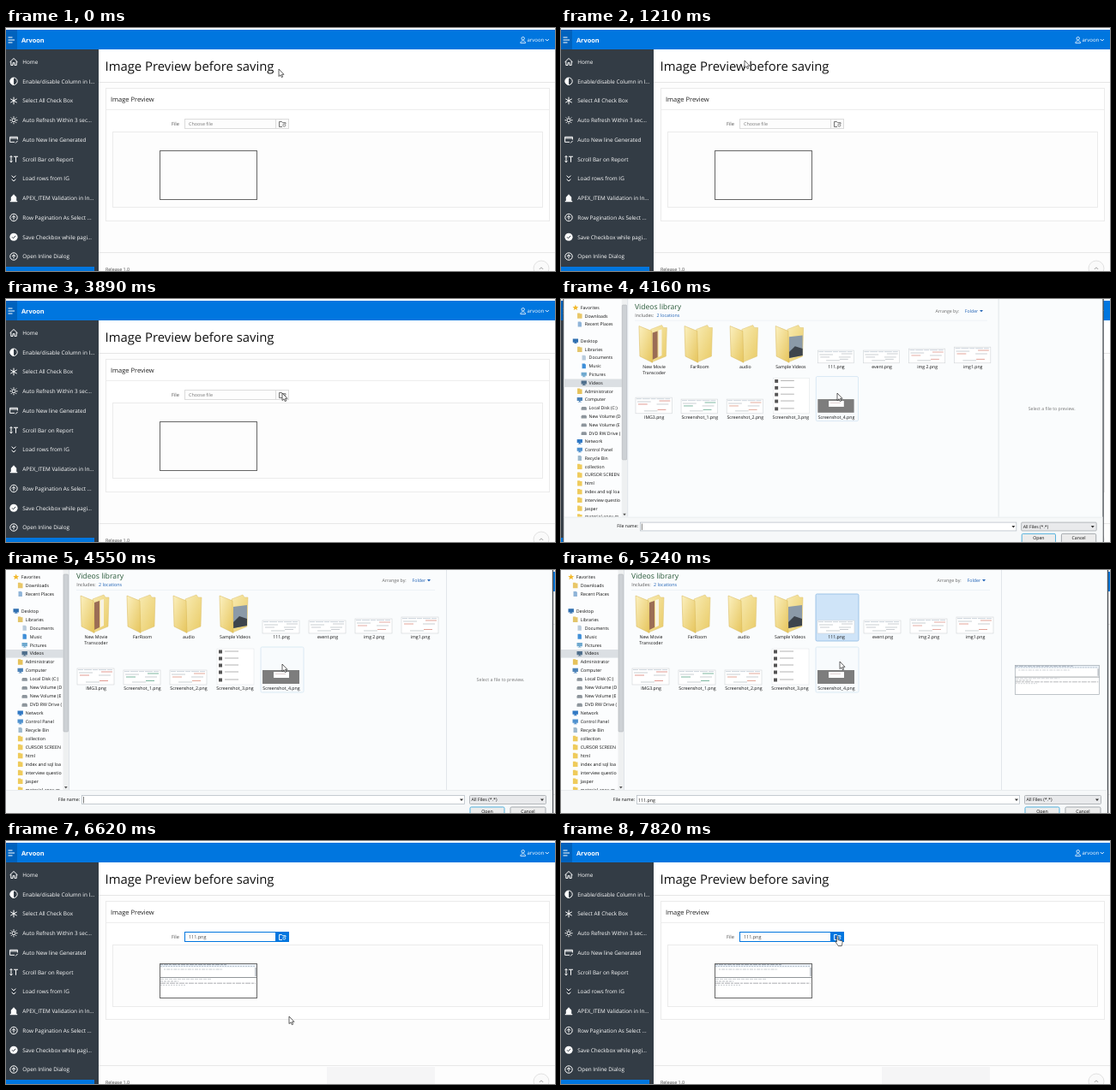
An HTML page that plays this animation: 640x284 px, repeating every 8000 ms.

```html
<!DOCTYPE html>
<html lang="en">
<head>
<meta charset="utf-8">
<title>Image preview before saving</title>
<style>
html, body { margin: 0; width: 100%; height: 100%; overflow: hidden; background: #fdfdfd; }
svg { display: block; width: 100vw; height: 100vh; }
text { font-family: "Open Sans", "Noto Sans", sans-serif; text-rendering: geometricPrecision; white-space: pre; }
</style>
</head>
<body>
<svg id="stage" viewBox="0 0 640 284" xmlns="http://www.w3.org/2000/svg"></svg>
<script>
const LOOP = 8000, BLUE = '#0076df', INK = '#111';

const text = (x, y, s, size, fill = INK, more = '') =>
  `<text x="${x}" y="${y}" font-size="${size}" fill="${fill}" ${more}>${s}</text>`;
const rect = (x, y, w, h, fill, more = '') =>
  `<rect x="${x}" y="${y}" width="${w}" height="${h}" fill="${fill}" ${more}/>`;
const frame = (x, y, w, h, stroke, more = '') =>
  rect(x + .5, y + .5, w - 1, h - 1, 'none', `stroke="${stroke}" ${more}`);
const line = (d, stroke, width = 1, more = '') =>
  `<path d="${d}" fill="none" stroke="${stroke}" stroke-width="${width}" ${more}/>`;
const shape = (d, fill, more = '') => `<path d="${d}" fill="${fill}" ${more}/>`;
const group = (id, body, more = '') => `<g id="${id}" ${more}>${body}</g>`;
const at = (x, y, body) => `<g transform="translate(${x} ${y})">${body}</g>`;
const fade = (id, from, to) => `<linearGradient id="${id}" x1="0" y1="0" x2="1" y2="1">
  <stop stop-color="${from}"/><stop offset="1" stop-color="${to}"/></linearGradient>`;
const mid = 'text-anchor="middle"';

// Miniature of a saved screen
function miniature(w, h) {
  const u = w / 114, v = h / 41;
  const bar = (y, x1, x2, c, dash = '') =>
    line(`M${x1 * u} ${y * v}H${x2 * u}`, c, .8 * v, dash && `stroke-dasharray="${dash}"`);
  return rect(0, 0, w, h, '#fff') +
    rect(0, 0, w, 4.5 * v, '#eaf0f6') +
    bar(1.6, 1, 78, '#8d9aa8', '3 1 5 1') + bar(3.4, 1, 112, '#a9b6c4', '2 1') +
    bar(7, 5, 74, '#b3bac1', '2 1.2 4 1') + rect(111 * u, 5 * v, 2 * u, 10 * v, '#c3c7cc') +
    bar(16.5, 0, 114, '#777c80') + bar(18.4, 1, 60, '#c2c6ca', '4 1') +
    bar(21, 1, 22, '#a6abb0', '3 1') + bar(23.2, 1, 112, '#96999d', '6 1 3 1') +
    bar(25.4, 1, 30, '#bcc0c4', '2 1');
}

/* ---- page ---- */
const RING = '<circle r="4.2" fill="none" stroke="#fff"/>';
const UP = RING + line('M0 2.4V-2M-2 0L0-2.2 2 0', '#fff');
const spokes = (n, r1, r2) => Array.from({ length: n }, (_, i) => {
  const a = i * 2 * Math.PI / n + Math.PI / 2, c = Math.cos(a), s = Math.sin(a);
  return `M${c * r1} ${s * r1}L${c * r2} ${s * r2}`;
}).join('');

const menu = [
  ['Home', line('M-4.5 .3L0-4 4.5.3M-3.2-.5V4H-1V1.2H1V4H3.2V-.5', '#fff')],
  ['Enable/disable Column in I...', RING + shape('M0-4.2A4.2 4.2 0 0 0 0 4.2Z', '#fff')],
  ['Select All Check Box', line(spokes(6, 0, 4.3), '#fff')],
  ['Auto Refresh Within 3 sec...', '<circle r="2" fill="none" stroke="#fff"/>' + line(spokes(8, 3, 4.5), '#fff')],
  ['Auto New line Generated', line('M1 2.8H-4.4V-3.2H4.4V0M-4.4-1.6H4.4M2 4L4.6 1.4', '#fff')],
  ['Scroll Bar on Report', line('M-3-3.6V3.6M-4.4-2.2L-3-3.8-1.6-2.2M-4.4 2.2L-3 3.8-1.6 2.2M0-3H5M2.5-3V3.5', '#fff')],
  ['Load rows from IG', line('M-2.4-3.4L0-1.2 2.4-3.4M-2.4.8L0 3 2.4.8', '#fff')],
  ['APEX_ITEM Validation in In...', shape('M-4.2 4.5V3.2H-3.2V-1L0-4.5 3.2-1V3.2H4.2V4.5Z', '#fff')],
  ['Row Pagination As Select ...', UP],
  ['Save Checkbox while pagi...', '<circle r="4.6" fill="#fff"/>' + line('M-2 0L-.5 1.6 2.2-1.4', '#333c45')],
  ['Open Inline Dialog', UP]
].map(([label, icon], i) => {
  const y = 39.5 + 22.75 * i;
  return at(9, y, icon) + text(19.3, y + 2.3, label, 6.36, '#fff');
}).join('');

const folderIcon = 'M318.5 115.5V109.5H321.5L322.5 110.7H326V112M318.5 115.5H322';

const page =
  rect(0, 0, 640, 284, '#fdfdfd') +
  rect(108, 25, 532, 38, '#fff') + line('M108 63.5H640', '#e6e6e6') +
  text(115.5, 50, 'Image Preview before saving', 14.85) +
  rect(116.5, 70.5, 517, 155, '#fff', 'id="outer" stroke="#ebebeb"') +
  line('M117 95.5H633', '#ededed') +
  rect(124.5, 121.5, 501, 88, '#fdfdfd', 'id="inner" stroke="#ebebeb"') +
  text(122, 85.8, 'Image Preview', 7.5, '#222') +
  text(193, 114.3, 'File', 5.7, '#555') +
  rect(208.5, 106.5, 106, 11, '#fdfdfd', 'id="field" stroke="#dcdcdc"') +
  text(213, 114.2, 'Choose file', 5.43, '#777', 'id="fileLabel"') +
  rect(314.5, 106.5, 15, 11, '#fbfbfb', 'id="button" stroke="#dcdcdc"') +
  group('buttonIcon', line(folderIcon, 'currentColor', .9) +
    '<circle cx="324.3" cy="113.6" r="1.5" fill="none" stroke="currentColor" stroke-width=".8"/>') +
  group('emptyBox', frame(179, 143, 114, 58, '#666')) +
  group('picture', at(179, 143, miniature(114, 41)) + frame(179, 143, 114, 41, '#666') +
    rect(374, 264, 126, 20, '#f5f5f6')) +
  line('M108 262.5H640', '#e8e8e8') +
  text(116, 283.6, 'Release 1.0', 5.35, '#444') +
  '<circle cx="624" cy="281" r="9" fill="#fafafa" stroke="#e2e2e2"/>' +
  line('M621.8 282L624 279.8 626.2 282', '#999', .9) +
  rect(0, 25, 108, 259, '#333c45') + menu + rect(0, 279, 103, 5, BLUE) +
  rect(0, 0, 640, 2, '#fff') + rect(0, 2, 640, 23, BLUE) + rect(0, 2, 13, 23, '#0062bd') +
  line('M2.5 11H7.5M2.5 14H10M2.5 17H7.5', '#fff', 1.2) +
  text(18, 16.9, 'Arvoon', 7.4, '#fff', 'font-weight="700"') +
  '<circle cx="602.7" cy="12.2" r="1.7" fill="none" stroke="#fff" stroke-width=".8"/>' +
  line('M599.8 17.6C599.8 14 605.6 14 605.6 17.6Z', '#fff', .8) +
  text(607.5, 16.3, 'arvoon', 6, '#fff') + line('M628.8 13L630.8 15 632.8 13', '#fff', .9);

/* ---- file dialog ---- */
const iconShapes = {
  star: 'M0-3.4L1 -1 3.4-.9 1.6.7 2.2 3.2 0 1.8-2.2 3.2-1.6.7-3.4-.9-1-1Z',
  folder: 'M-2.8-3.2H.2L.8-2.4H2.8V3.2H-2.8Z',
  screen: 'M-3.2-2.6H3.2V1.6H.8V2.4H2V3H-2V2.4H-.8V1.6H-3.2Z',
  drive: 'M-3.2.2L-2.4-1.4H2.4L3.2.2V2.4H-3.2Z',
  sheet: 'M-2.2-3H1L2.2-1.8V3H-2.2Z'
};
// label, indent, icon, colour ('' leaves an empty row)
const places = [
  ['Favorites', 0, 'star', '#f2b92d'], ['Downloads', 1, 'folder', '#e9c768'],
  ['Recent Places', 1, 'sheet', '#8fb4d8'], '',
  ['Desktop', 0, 'screen', '#2f6fb0'], ['Libraries', 1, 'folder', '#e3c56b'],
  ['Documents', 2, 'sheet', '#b9cbdc'], ['Music', 2, 'sheet', '#3f8fd8'],
  ['Pictures', 2, 'screen', '#6fa9cf'], ['Videos', 2, 'screen', '#4f6f8c'],
  ['Administrator', 1, 'folder', '#e6c25c'], ['Computer', 1, 'screen', '#4d83b8'],
  ...['Local Disk (C:)', 'New Volume (D', 'New Volume (E', 'DVD RW Drive (']
    .map(s => [s, 2, 'drive', '#8d959c']),
  ['Network', 1, 'screen', '#2f78c4'], ['Control Panel', 1, 'screen', '#4f91cf'],
  ['Recycle Bin', 1, 'sheet', '#9fb9cc'],
  ...['collection', 'CURSOR SCREEN', 'html', 'index and sql loa', 'interview questio', 'Jasper', 'material-apex-m']
    .map(s => [s, 1, 'folder', '#efcb5c'])
].map((p, i) => {
  if (!p) return '';
  const [label, level, icon, color] = p, x = 17.7 + 5 * level, y = 8 + 9.95 * i;
  return at(x - 6, y, shape(iconShapes[icon], color)) + text(x, y + 1.9, label, 5.25);
}).join('');

const folder = inside =>
  shape('M-4 5L9 0 11 3H15L14 37-3 44Z', 'url(#backLeaf)', 'stroke="#dcc172" stroke-width=".5"') + inside +
  shape('M-18 1L-3 7 -2 44.5-17 37Z', 'url(#frontLeaf)', 'stroke="#d6b452" stroke-width=".5"');

// Saved screen with short lines of text, some of them tinted
const sheet = (top, tint = '#c3c8cd') =>
  rect(-22, top, 43, 74 - top, '#fff', 'stroke="#cfd3d6" stroke-width=".6"') +
  line(`M-21 ${top + 1.6}H20`, '#c0cad4', .8, 'stroke-dasharray="6 1 9 1"') +
  line(`M-20 ${top + 5}H-4M3 ${top + 8}H17M-12 71H4`, '#b4babf', .7) +
  line(`M-19 ${top + 8}H-8M6 ${top + 4}H19M4 69.5H14`, tint, .9);

const listSheet = rect(-21, 32, 43, 42, '#fff', 'stroke="#dfe2e5" stroke-width=".5"') +
  [35, 43, 51, 59, 68].map(y => rect(-19, y - 1.5, 4, 4, '#555') + line(`M-12 ${y}H4`, '#aaa', .9)).join('');
const darkSheet = rect(-22, 57, 43, 16, '#7d7d7d') + rect(-9, 59, 18, 7, '#fff') + line('M-7 61.5H5', '#ccb4b4', .6);

const files = [
  ['New Movie|Transcoder', folder(shape('M-2 9L4 7V38L-2 41Z', '#9b6d55') + shape('M5 6L9 5V36L5 38Z', '#f7f2e2'))],
  ['FarRoom', folder('')],
  ['audio', folder('')],
  ['Sample Videos', folder(shape('M-2 14L14 12V36L-2 39Z', '#8b9aa8') + shape('M-2 32L5 25 14 28V36L-2 39Z', '#3d444c'))],
  ['111.png', sheet(59)], ['event.png', sheet(59)],
  ['img 2.png', sheet(57, '#e3a39a')], ['img1.png', sheet(55, '#e09a8e')],
  ['IMG3.png', sheet(55, '#df8f86')], ['Screenshot_1.png', sheet(57, '#6fae95')],
  ['Screenshot_2.png', sheet(57, '#e0a08f')], ['Screenshot_3.png', listSheet],
  ['Screenshot_4.png', darkSheet]
].map(([label, art], i) => at(105 + 54 * (i % 8), 60 * (i >> 3),
  (i < 4 ? at(0, 29, art) : art) +
  label.split('|').map((s, k) => text(0, 80 + 7 * k, s, 5.25, INK, mid)).join(''))
).join('');

const tile = (id, y, h, fill, stroke) =>
  rect(297, y, 50, h, fill, `id="${id}" rx="1.5" stroke="${stroke}" stroke-width=".8"`);
const pushBox = (x, w, fill, stroke) => rect(x, 277, w, 11, fill, `rx="1.5" stroke="${stroke}"`);

const dialog =
  rect(-2.5, -7, 640, 300, '#fafcfd', 'stroke="#4a4f55" stroke-width="1.4"') +
  rect(-2, -6, 75, 263, '#fcfdfe') + rect(-2, 93, 69, 9.6, '#dbdfe3') +
  `<g clip-path="url(#navClip)">${places}</g>` +
  rect(66.5, -6, 6.5, 263, '#eef0f1') + rect(67, 5, 5.5, 184, '#cdd1d5', 'rx="1" stroke="#a9adb1" stroke-width=".5"') +
  shape('M68 253H71.6L69.8 255.4Z', '#555') + line('M73.5 -6V257', '#dfe3e8') +
  text(82, 10, 'Videos library', 8.7, '#2a5a3a') +
  text(82.3, 19, 'Includes:', 5.4, '#555') + text(108, 19, '2 locations', 5.4, '#1f62b5') +
  text(438.5, 13.8, 'Arrange by:', 5.3, '#666') + text(473.5, 13.8, 'Folder', 5.3, '#1f62b5') +
  shape('M491 11H495L493 13.4Z', '#1f62b5') + line('M82 23.5H500', '#e9eef4', .7) +
  tile('picked', 28, 55, '#cfe4f8', '#8fb9e2') + tile('hover', 90, 53, '#f8fbfd', '#d3e5f2') + files +
  line('M513.5 -6V257', '#e2e6ea') +
  text(576.5, 130, 'Select a file to preview.', 5.3, '#777', `id="hint" ${mid}`) +
  group('preview', at(529, 111, miniature(99, 35)) + frame(529, 111, 99, 35, '#a3abb2', 'stroke-width=".7"')) +
  rect(-2, 257, 639, 34, '#f6f8f9') + line('M-2 257.5H637', '#e4e7ea', .7) +
  text(60.8, 270, 'File name:', 5.3) +
  rect(88.5, 263.5, 446, 10, '#fff', 'stroke="#b9c0c8" stroke-width=".8"') +
  shape('M529 267.5H533L531 270Z', '#333') +
  line('M90.5 265V272.5', '#222', .6, 'id="caret"') +
  rect(89.5, 264.8, 22, 7.8, '#3390e8', 'id="marked"') +
  text(90, 270.5, '111.png', 5.3, INK, 'id="name"') +
  rect(540.5, 263.5, 89, 10, '#e9eaec', 'rx="1" stroke="#a4a9ae" stroke-width=".8"') +
  text(542.5, 270.4, 'All Files (*.*)', 5.3) + shape('M623 267.5H627L625 270Z', '#333') +
  pushBox(541, 40, '#ececec', '#53b1dc') +
  group('openHot', pushBox(541, 40, '#c9e8f8', '#3c9fd0') + line('M574.5 278V288', '#7fb9d6', .7) +
    shape('M576 281H580L578 283.4Z', '#333')) +
  text(561, 284, 'Open', 5.3, INK, mid) +
  pushBox(588, 41, '#ececec', '#a4a9ae') + text(608.5, 284, 'Cancel', 5.3, INK, mid);

const stage = document.getElementById('stage');
const outline = 'stroke="#222" stroke-width=".7" stroke-linejoin="round"';
stage.innerHTML =
  '<defs><clipPath id="navClip"><rect x="-2" y="-6" width="68" height="263"/></clipPath>' +
  fade('backLeaf', '#f8ebb2', '#e9cb66') + fade('frontLeaf', '#fbf0bf', '#e6c55c') + '</defs>' +
  group('page', page) + group('dialog', dialog) +
  group('cursor',
    shape('M0 0V8.6L2 6.8 3.3 9.7 4.7 9.1 3.4 6.3H6Z', '#fff', `id="arrow" ${outline}`) +
    shape('M2 0C3 0 3.1.7 3.1 1.2V4.6L7.2 5.6C8 5.8 8.2 6.4 8.1 7.2 8 9 7.4 10 7.2 11.6H3.2C2.7 10.2.6 8.4 0 6.7.3 5.9 1 6.1 1.4 6.9V1.2C1.4.6 1.4 0 2 0Z', '#fff', `id="hand" ${outline}`));

/* ---- motion ---- */
// Each move advances one point per step between its first and last change.
const moves = [
  [280, 940, [[290, 46], [252, 42], [214, 38], [176, 34], [142, 36], [119, 40]]],
  [1210, 1900, [[214, 38], [308, 21], [240, 48], [150, 74], [113, 96], [176, 104]]],
  [2180, 3190, [[214, 107], [262, 107], [300, 106], [321, 107], [327, 111], [329, 112], [325, 109], [323, 107]]],
  [3740, 4700, [[322, 110]]],
  [4860, 5780, [[321, 92], [320, 66], [320, 64], [325, 107], [390, 160], [470, 215], [540, 260], [566, 278]]],
  [5930, 6890, [[566, 278], [566, 278], [566, 278], [520, 262], [430, 232], [330, 205], [262, 184], [221, 174]]],
  [7010, 7820, [[236, 166], [254, 154], [272, 143], [288, 133], [302, 124], [314, 116], [320, 111]]]
];

function cursorAt(t) {
  let pos = [318, 48];
  for (const [start, end, pts] of moves) {
    if (t < start) break;
    // the slack absorbs the slightly uneven step lengths
    const step = Math.floor((t - start) / (end - start) * (pts.length - 1) + .2);
    pos = pts[Math.min(step, pts.length - 1)];
  }
  return pos;
}

const el = {};
stage.querySelectorAll('[id]').forEach(n => el[n.id] = n);
const show = (id, on) => el[id].setAttribute('display', on ? 'inline' : 'none');
const set = (id, attrs) => { for (const k in attrs) el[id].setAttribute(k, attrs[k]); };
const within = (t, a, b) => t >= a && t < b;

function draw(t) {
  const [x, y] = cursorAt(t);
  const focused = t >= 4040, picked = t >= 5110, confirmed = t >= 5930, chosen = t >= 6210;
  const opening = within(t, 4160, 4290), closing = within(t, 6080, 6210);

  set('cursor', { transform: `translate(${x} ${y})` });
  const hand = within(t, 2590, 3740) || t >= 7815;
  show('hand', hand);
  show('arrow', !hand);

  set('outer', { height: chosen ? 138 : 155 });
  set('inner', { height: chosen ? 72 : 88 });
  set('field', { stroke: focused ? BLUE : '#dcdcdc' });
  set('button', { fill: focused ? BLUE : '#fbfbfb', stroke: focused ? BLUE : '#dcdcdc' });
  set('buttonIcon', { color: focused ? '#fff' : '#666' });
  el.fileLabel.textContent = chosen ? '111.png' : 'Choose file';
  set('fileLabel', { fill: chosen ? '#444' : '#777' });
  show('emptyBox', !chosen);
  show('picture', chosen);

  show('dialog', within(t, 4160, 6210));
  set('dialog', {
    opacity: closing ? .87 : 1,
    transform: opening || closing ? 'translate(318 122) scale(.983) translate(-318 -122)' : ''
  });
  show('picked', picked && !closing);
  show('hover', within(x, 297, 347) && within(y, 90, 143));
  show('hint', !picked);
  show('preview', picked);
  show('caret', !picked);
  show('name', picked);
  show('marked', confirmed);
  set('name', { fill: confirmed ? '#fff' : INK });
  show('openHot', t >= 5780);
}

const t0 = performance.now();
function tick() {
  draw((performance.now() - t0) % LOOP);
  requestAnimationFrame(tick);
}
tick();
</script>
</body>
</html>
```
